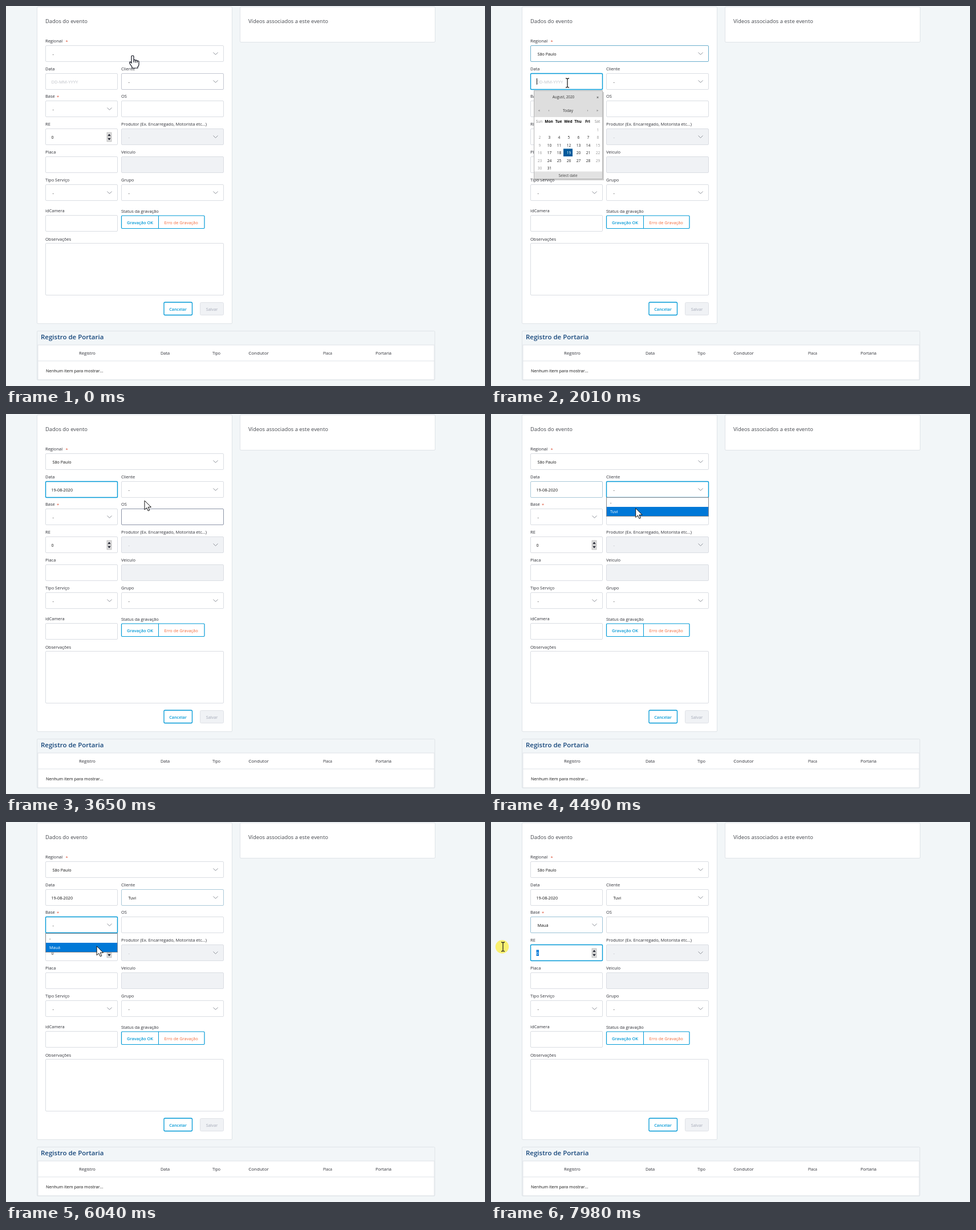
Write an HTML page that moves like this. It is 840x667 px and loops after 8000 ms.

```html
<!DOCTYPE html>
<html lang="pt-BR">
<head>
<meta charset="utf-8">
<title>Dados do evento</title>
<style>
html, body { margin: 0; width: 100%; height: 100%; overflow: hidden; background: #f2f6f8; }
svg { display: block; width: 840px; height: 667px; font-family: "Open Sans", "Noto Sans", sans-serif; }
</style>
</head>
<body>
<svg id="stage" viewBox="0 0 840 667"></svg>
<script>
const LOOP = 8000, STEP = 77.5, START = 60;
const BLUE = '#0099d6', LINE = '#dadde3', INK = '#2d2f36', GREY = '#a9adb5';
const client = 'Tuvi';

// name, label, x, y, width, flags: s = select, d = disabled, r = required
const fields = [
  ['regional', 'Regional', 69, 69, 313, 'sr'],
  ['date', 'Data', 69, 118, 127, ''],
  ['client', 'Cliente', 202, 118, 180, 's'],
  ['base', 'Base', 69, 166, 127, 'sr'],
  ['os', 'OS', 202, 166, 180, ''],
  ['re', 'RE', 69, 215, 127, ''],
  ['maker', 'Produtor (Ex. Encarregado, Motorista etc...)', 202, 215, 180, 'sd'],
  ['plate', 'Placa', 69, 264, 127, ''],
  ['vehicle', 'Veículo', 202, 264, 180, 'd'],
  ['service', 'Tipo Serviço', 69, 313, 127, 's'],
  ['group', 'Grupo', 202, 313, 180, 's'],
  ['camera', 'idCamera', 69, 367, 127, '']
];

const focusTimes = [['regional', 310], ['date', 1880], ['client', 4030], ['base', 5580], ['re', 7600]];
const hovers = [
  ['client', -60, 60], ['regional', 60, 310], ['os', 3300, 3720], ['client', 3720, 4030],
  ['os', 4850, 5200], ['base', 5200, 5580], ['os', 6740, 7080]
];

// time, x, y, pointer shape from here on
const path = [
  [0, 222, 87, 'hand'], [140, 221, 84, 'hand'], [310, 221, 84, 'arrow'], [600, 214, 90, 'arrow'],
  [990, 193, 117, 'arrow'], [1240, 193, 119, 'arrow'], [1650, 145, 133, 'beam'], [1900, 134, 135, 'beam'],
  [2000, 134, 135, 'beam'], [2160, 134, 160, 'arrow'], [2700, 136, 256, 'arrow'], [3000, 136, 257, 'arrow'],
  [3625, 243, 152, 'arrow'], [3720, 246, 144, 'hand'], [3880, 250, 135, 'hand'], [4030, 250, 136, 'arrow'],
  [4570, 254, 168, 'arrow'], [4880, 248, 168, 'beam'], [5040, 245, 170, 'beam'], [5230, 203, 180, 'hand'],
  [5400, 182, 183, 'hand'], [5580, 182, 184, 'arrow'], [6040, 159, 218, 'arrow'], [6270, 157, 219, 'arrow'],
  [6430, 158, 219, 'arrow'], [6650, 215, 195, 'beam'], [6790, 242, 190, 'beam'], [6900, 240, 190, 'beam'],
  [7220, 165, 226, 'beam'], [7500, 100, 230, 'beam'], [7600, 98, 230, 'beam'], [7960, 21, 219, 'beam']
];

const rect = (x, y, w, h, fill, stroke = 'none', r = 0, lw = 1) =>
  `<rect x="${x}" y="${y}" width="${w}" height="${h}" rx="${r}" style="fill:${fill};stroke:${stroke};stroke-width:${lw}"/>`;
const text = (s, x, y, size = 7.5, fill = INK, extra = '') =>
  `<text x="${x}" y="${y}" font-size="${size}" fill="${fill}" ${extra}>${s}</text>`;
const line = (d, stroke, lw = 1, fill = 'none') =>
  `<path d="${d}" fill="${fill}" stroke="${stroke}" stroke-width="${lw}"/>`;
const mid = 'text-anchor="middle"';
const weight = n => `font-weight="${n}"`;
const mix = (a, b, p) => `color-mix(in srgb, ${a} ${Math.round(p * 100)}%, ${b})`;

function border(name, t) {
  const last = focusTimes.filter(f => t >= f[1]).length - 1;
  if (last >= 0 && focusTimes[last][0] === name) return BLUE;
  if (last > 0 && focusTimes[last - 1][0] === name) {
    const left = 1 - (t - focusTimes[last][1]) / 700;
    if (left > 0) return mix('#55a5c8', LINE, left);
  }
  const hover = hovers.find(h => h[0] === name && t >= h[1] && t < h[2]);
  return hover ? mix('#8d95a8', LINE, Math.min(1, (t - hover[1]) / 200)) : LINE;
}

function value(name, t) {
  if (name === 'regional') return t < 1240 ? '-' : 'São Paulo';
  if (name === 'client') return t < 4730 ? '-' : client;
  if (name === 'base') return t < 6430 ? '-' : 'Mauá';
  return '-';
}

function field([name, label, x, y, w, flags], t) {
  const has = f => flags.includes(f);
  const stroke = border(name, t);
  let out = text(label, x, y - 5);
  if (has('r')) out += text('*', x + (name === 'base' ? 20 : 35.5), y - 4.5, 7.5, '#dc5238');
  out += rect(x + .5, y + .5, w - 1, 28, has('d') ? '#f0f2f5' : '#fff', stroke, 1.5, stroke === BLUE ? 1.4 : 1);
  if (has('s')) {
    out += text(value(name, t), x + 12.5, y + 17.5, 7.2, has('d') ? GREY : '#111', weight(500));
    out += line(`M${x + w - 18.5} ${y + 12.5}l4 4 4-4`, '#8d9199');
  }
  return out;
}

function frame() {
  let out = rect(0, 0, 840, 667, '#f2f6f8') +
    rect(54.5, 1.5, 342, 556, '#fff', '#dfe4e8', 1.5) +
    rect(410.5, 1.5, 342, 62, '#fff', '#dfe4e8', 1.5) +
    text('Dados do evento', 69, 30, 9.4, '#44474d', weight(500)) +
    text('Vídeos associados a este evento', 425, 30, 9.4, '#44474d', weight(500)) +
    text('Status da gravação', 202, 362.5) +
    rect(202.5, 368, 145.5, 22.5, '#fff', BLUE, 1.5, 1.2) +
    line('M267.5 368v22.5', BLUE) +
    text('Gravação OK', 235, 383, 7.4, BLUE, mid + weight(600)) +
    text('Erro de Gravação', 307, 383, 7.4, '#f26a3b', mid + weight(500)) +
    text('Observações', 69, 411.5) +
    rect(69.5, 416.5, 312, 91, '#fff', LINE, 1.5) +
    rect(277, 520, 49.5, 22.5, '#fff', BLUE, 2, 1.3) +
    text('Cancelar', 301.5, 535, 7.3, BLUE, mid + weight(600)) +
    rect(340.5, 520.5, 41, 22, '#f0f2f5', '#dfe2e7', 2) +
    text('Salvar', 361, 535, 7.3, '#a5aab8', mid);
  out += rect(54.5, 570.5, 697.5, 86, '#f2f6f8', '#dfe4e8', 1.5) +
    text('Registro de Portaria', 61, 585, 11.5, '#14457a', weight(600)) +
    rect(56, 595, 695, 61, '#fff', '#dfe4e8') +
    line('M56 623H751', '#dfe4e8');
  [['Registro', 142.5, 7.6], ['Data', 279, 7.4], ['Tipo', 369, 7], ['Condutor', 443, 8],
   ['Placa', 564, 6.5], ['Portaria', 662, 7.5]]
    .forEach(([s, x, size]) => out += text(s, x, 612, size, INK, mid));
  return out + text('Nenhum item para mostrar...', 70, 642.5, 7.4, '#111');
}

function inputs(t) {
  let out = t < 2950
    ? text('DD-MM-YYYY', 79.5, 135.5, 7.6, '#bfc2c8')
    : text('19-08-2020', 79.5, 135.5, 7.2, '#111');
  if (t >= 1880 && t < 2950) out += line('M80.5 127v11', '#111');
  const selected = t >= 7700;
  if (selected) out += rect(79.5, 224.5, 4.5, 10.5, '#0078d7');
  out += text('0', 79.5, 232.5, 7.2, selected ? '#fff' : '#111');
  return out + rect(177, 222, 8, 16, '#dcdcdc', '#aaa', 0, .6) + line('M177 230h8', '#999', .6) +
    line('M178.3 228l2.7-3.5 2.7 3.5zM178.3 232l2.7 3.5 2.7-3.5z', 'none', 0, '#1c1f2c');
}

function dropdown(x, y, w, option, active) {
  return rect(x + .5, y + .5, w - 1, 33, '#fff', '#85888e') +
    rect(x + 1, y + (active ? 17 : 1), w - 2, 16, '#0078d7') +
    text('-', x + 7, y + 11.5, 7.2, active ? '#111' : '#fff') +
    text(option, x + 7, y + 27.5, 7.2, active ? '#fff' : '#111');
}

function calendar() {
  const col = c => 84.5 + 17 * c;
  let out = rect(78, 151, 120, 155, '#00000030') +
    rect(75.5, 148.5, 120, 155, '#fff', '#b5b5b5') +
    rect(76, 149, 119, 46, '#dedede') + rect(76, 290.5, 119, 12.5, '#e2e2e2') +
    text('August, 2020', 127, 162, 6.4, '#333', mid) + text('×', 187, 162.5, 7, '#222', mid) +
    text('Today', 135, 185.5, 6.6, '#333', mid) + text('Select date', 135, 299.5, 6.5, '#444', mid);
  ['«', '‹', '', '', '', '›', '»'].forEach((s, c) => out += text(s, col(c), 185, 6, '#444', mid));
  ['Sun', 'Mon', 'Tue', 'Wed', 'Thu', 'Fri', 'Sat'].forEach((s, c) =>
    out += text(s, col(c), 204.5, 6.6, c % 6 ? '#000' : '#888', mid + weight(c % 6 ? 700 : 400)));
  out += rect(127, 250.5, 16, 13.5, '#005a9c');
  for (let d = 1; d <= 31; d++) {
    const c = (d + 5) % 7, row = Math.floor((d + 5) / 7);
    out += text(d, col(c) + 1, 220 + 13.4 * row, 6.6, d === 19 ? '#fff' : c % 6 ? '#222' : '#999', mid);
  }
  return out;
}

const shapes = {
  arrow: line('M0 0V16L3.7 12.6 6.2 18 8.7 17 6.2 11.5H11.5Z', '#111', 1, '#fff'),
  hand: line('M-2 2Q-2 0 0 0T2 2V8Q4 6.5 5 8.5Q7 7.3 8 9.5Q11 8.8 11 11V16Q11 18 9 20V22H-1V20L-5 14Q-6 11 -4 11L-2 13Z' +
    'M2 8v4M5 8.5v4M8 9.5v3', '#10131f', 1.2, '#fff'),
  beam: line('M-3-8Q0-8 0-6.5Q0-8 3-8M0-7V7M-3 8Q0 8 0 6.5Q0 8 3 8', '#222', 1.3)
};

function pointer(t) {
  let i = path.length - 1;
  while (i && path[i][0] > t) i--;
  const a = path[i], b = path[i + 1] || a;
  const p = b === a ? 0 : (t - a[0]) / (b[0] - a[0]);
  const ease = p * p * (3 - 2 * p);
  const x = a[1] + (b[1] - a[1]) * ease, y = a[2] + (b[2] - a[2]) * ease;
  const spot = t >= 7600 ? '<circle cx="-1.5" cy="0" r="11.7" fill="#fbf060" opacity=".9"/>' : '';
  return `<g transform="translate(${x.toFixed(1)} ${y.toFixed(1)})">${spot}${shapes[a[3]]}</g>`;
}

function draw(t) {
  let out = frame() + fields.map(f => field(f, t)).join('') + inputs(t);
  if (t >= 310 && t < 1240) out += dropdown(69, 97, 312, 'São Paulo', t >= 900);
  if (t >= 1880 && t < 2950) out += calendar();
  if (t >= 4030 && t < 4730) out += dropdown(202, 146, 180, client, t >= 4400);
  if (t >= 5580 && t < 6430) out += dropdown(69, 195, 127, 'Mauá', t >= 5950);
  return out + pointer(t);
}

const stage = document.getElementById('stage');
let shown = -1;
function tick() {
  const now = performance.now() % LOOP;
  const t = Math.max(0, START + STEP * Math.floor((now - START) / STEP));
  if (t !== shown) stage.innerHTML = draw(shown = t);
  requestAnimationFrame(tick);
}
tick();
</script>
</body>
</html>
```
